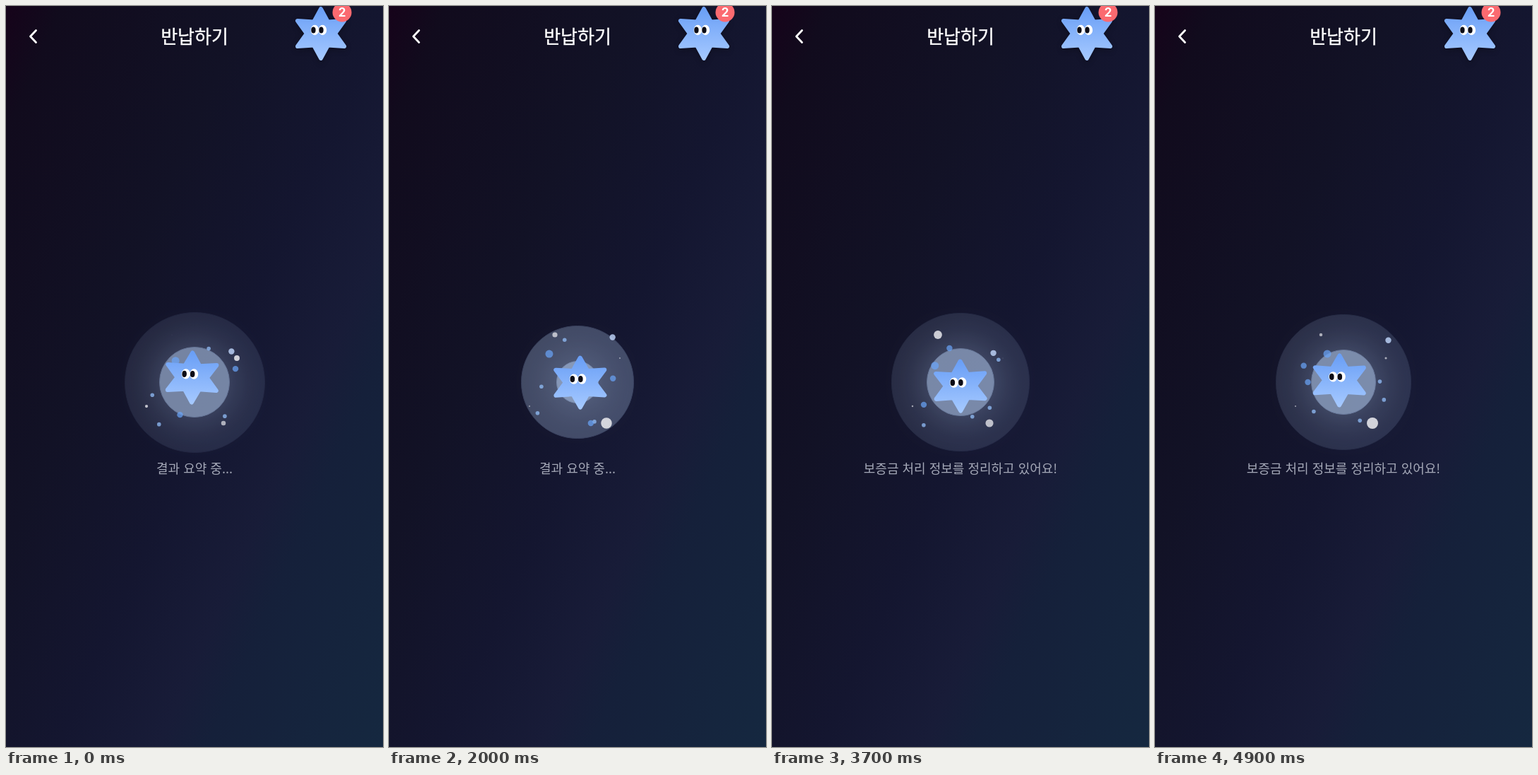
Recreate the animation shown at these times as an HTML page. Size 534 px wide and 1048 px high, loop 5 s.

```html
<!DOCTYPE html>
<html lang="ko">
<head>
<meta charset="utf-8">
<title>반납하기</title>
<style>
html, body { margin: 0; width: 100%; height: 100%; overflow: hidden; }
body {
  position: relative;
  background: linear-gradient(114deg, #16031a, #110b1d 8%, #121226 34%, #141630 54%,
    #181c38 68%, #15203a 75%, #152840);
}
svg { position: absolute; left: 0; top: 0; }
.ring {
  position: absolute;
  box-sizing: border-box;
  border-radius: 50%;
  background: rgb(190, 216, 252);
  border: 1px solid rgb(155, 180, 220);
  box-shadow: 0 0 60px 3px rgba(185, 212, 250, var(--glow));
}
text { font-family: "Noto Sans CJK KR", "Noto Sans KR", "Noto Sans CJK JP", sans-serif; text-anchor: middle; }
.title { font-size: 26px; font-weight: 500; fill: #fff; stroke: #fff; stroke-width: .4px; }
.status { font-size: 18px; fill: #a5a9b8; }
.badge { font: bold 17px Inter, "Liberation Sans", sans-serif; fill: #fff; }
#badgeStar { filter: drop-shadow(0 2px 4px rgba(0, 0, 0, .3)); }
</style>
</head>
<body>
<div class="ring"></div>
<div class="ring"></div>
<div class="ring"></div>
<svg width="534" height="1048" viewBox="0 0 534 1048">
  <defs>
    <linearGradient id="sky" x1="0" y1="0" x2="0" y2="1">
      <stop offset="0" stop-color="#6a9ff6"/>
      <stop offset="1" stop-color="#a4c8ff"/>
    </linearGradient>
    <g id="star">
      <path fill="url(#sky)" stroke="url(#sky)" stroke-width="6" stroke-linejoin="round"
        d="M0-35L10.5-16.5L34.5-18L21 0L34.5 18L10.5 16.5L0 35L-10.5 16.5L-34.5 18L-21 0L-34.5-18L-10.5-16.5Z"/>
      <g fill="#fff"><ellipse cx="-9" cy="-5" rx="6" ry="7.2"/><ellipse cx="2.5" cy="-5" rx="6" ry="7.2"/></g>
      <g fill="#0b0b16"><ellipse cx="-11" cy="-5" rx="3.3" ry="4.6"/><ellipse cx=".5" cy="-5" rx="3.3" ry="4.6"/></g>
    </g>
  </defs>
  <path d="M42.5 34.5L34.5 43L42.5 51.5" fill="none" stroke="#fff" stroke-width="2.8" stroke-linecap="round" stroke-linejoin="round"/>
  <text class="title" x="267" y="52.5">반납하기</text>
  <use id="badgeStar" href="#star" transform="translate(446 39) scale(.96 1)"/>
  <circle cx="476" cy="9" r="13.5" fill="#fb6a70"/>
  <text class="badge" x="476" y="15">2</text>
  <g id="dots"></g>
  <use id="hero" href="#star"/>
  <text class="status" id="status" x="267" y="661"></text>
</svg>
<script>
const LOOP = 5000, STEP = 100, TEXT_SWAP = 2500;
const CX = 267, CY = 532;
const GAP = 49.5, RIPPLE = 1.25, TWINKLE = 1.5;
const BLUE = "rgba(105,165,250,.7)", PALE = "rgba(195,217,255,.8)", SOFT = "rgba(150,195,255,.72)", WHITE = "#eeeef2";

const byId = id => document.getElementById(id);
const clamp = (v, lo, hi) => Math.min(hi, Math.max(lo, v));
// Cosine wave with its crest at the given time, shifted by a part of a turn.
const wave = (t, period, crest, shift = 0) => Math.cos(2 * Math.PI * ((t - crest) / period - shift));

function dot(fill, motion) {
  const el = document.createElementNS("http://www.w3.org/2000/svg", "circle");
  el.setAttribute("fill", fill);
  byId("dots").append(el);
  return t => {
    const { x, y, r, opacity = 1 } = motion(t);
    el.setAttribute("cx", x);
    el.setAttribute("cy", y);
    el.setAttribute("r", r);
    el.setAttribute("opacity", opacity);
  };
}

// Stays in place and swells from a small to a large radius.
const twinkle = (x, y, small, large, crest) => dot(WHITE, t => {
  const k = (1 + wave(t, TWINKLE, crest)) / 2;
  return { x, y, r: small + (large - small) * k, opacity: .55 + .3 * k };
});

// Circles the centre: distance, start angle and degrees per second.
const orbit = (fill, r, distance, start, speed) => dot(fill, t => {
  const a = (start + speed * t) * Math.PI / 180;
  return { x: CX + distance * Math.cos(a), y: CY + distance * Math.sin(a), r };
});

// Sways along a slanted ellipse around its own place.
const drift = (fill, r, x, y, reach, period, crest) => dot(fill, t => ({
  x: x + reach * wave(t, period, crest),
  y: y - reach * wave(t, period, crest, 1 / 6),
  r
}));

const dots = [
  twinkle(235, 465, 0, 6.5, .85),
  twinkle(327, 498, .4, 4, 1.44),
  twinkle(199, 566, 1, 2.5, 1.25),
  twinkle(308, 590, 0, 8, .42),
  drift(BLUE, 5.5, 232.5, 498, 11.5, 4.3, .58),
  drift(PALE, 4.2, 318, 478.5, 12.5, 4, .93),
  drift(SOFT, 2.8, 214.5, 583, 11.5, 3.8, .83),
  drift(SOFT, 2.8, 301, 579, 11, 3, .3),
  orbit(BLUE, 4.2, 50.5, 114, -60),
  orbit(BLUE, 4.2, 61, -18, 45),
  orbit(SOFT, 2.8, 62.5, 163, 45),
  orbit(SOFT, 2.8, 51.5, -67, -60)
];

// Ripples leave the centre one after another and fade as they widen.
const rings = [...document.querySelectorAll(".ring")];
function drawRings(t) {
  const first = (t / RIPPLE * GAP + .5) % GAP;
  rings.forEach(({ style }, i) => {
    const r = first + GAP * i;
    style.left = CX - r + "px";
    style.top = CY - r + "px";
    style.width = style.height = 2 * r + "px";
    style.opacity = clamp((111 - r) * .0086, 0, .55) * Math.min(1, r / 25);
    style.setProperty("--glow", .6 * clamp((80 - r) / 32, 0, 1));
  });
}

function drawHero(t) {
  const x = 266.5 - 3.7 * wave(t, 5, 0) + 2 * wave(t, 1.9, 2.25);
  const y = 532.5 + 7 * wave(t, 2.7, 1.33);
  const turn = -wave(t, 2.7, 1.4);
  byId("hero").setAttribute("transform", `translate(${x} ${y}) rotate(${turn})`);
}

function draw(ms) {
  const t = ms / 1000;
  drawRings(t);
  dots.forEach(place => place(t));
  drawHero(t);
  byId("status").textContent = ms < TEXT_SWAP ? "결과 요약 중..." : "보증금 처리 정보를 정리하고 있어요!";
}

function frame() {
  const ms = performance.now() % LOOP;
  draw(Math.floor(ms / STEP) * STEP);
  requestAnimationFrame(frame);
}
frame();
</script>
</body>
</html>
```
